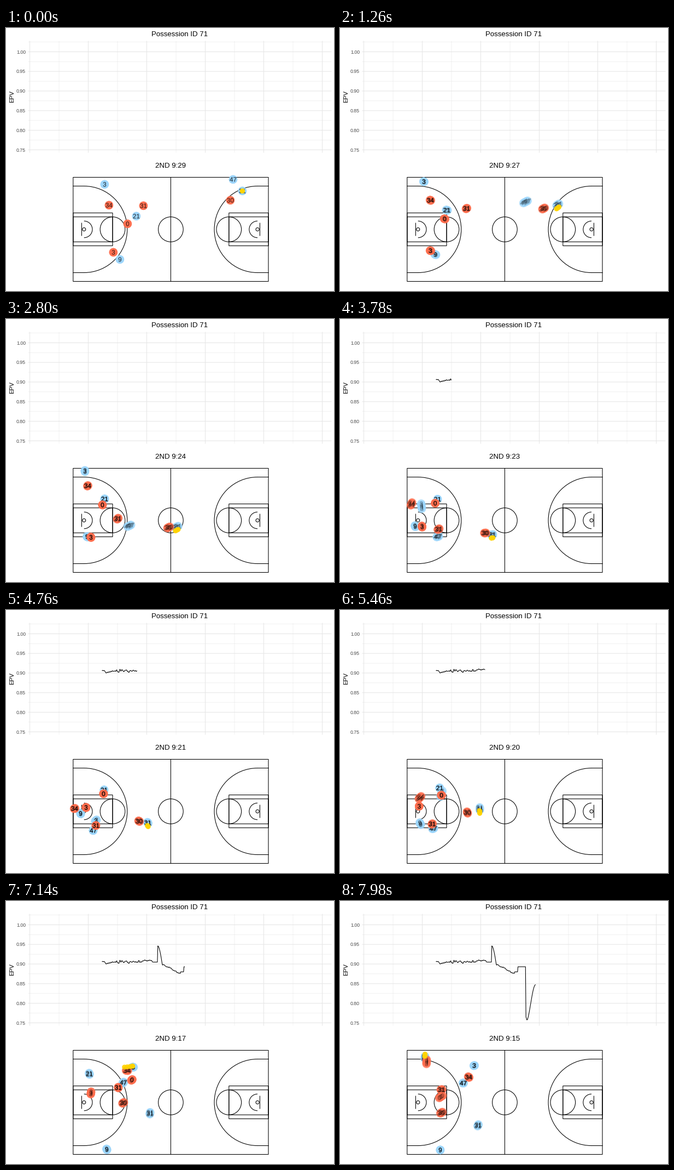
A matplotlib script for the animation above (8 s loop, 600 by 480 pixels).

```python
import numpy as np
import matplotlib.pyplot as plt
from matplotlib.animation import FuncAnimation
from matplotlib.collections import PathCollection
from matplotlib.patches import Arc, Circle, Rectangle
from matplotlib.path import Path
from matplotlib.textpath import TextPath
from matplotlib.transforms import Affine2D, IdentityTransform

plt.rcParams["font.family"] = "Liberation Sans"
PX = 0.72  # points per pixel at 100 dpi
STEP, TICK, LOOP = 140, 40, 8000
STEPS = (LOOP - 1) // STEP + 1
SAMPLES = 6  # tracking samples stamped per step
BLUE, RED, GOLD = "#9CD6FC", "#FF6D4D", "#FFD400"
STROKE = dict(lw=1.07 * PX, snap=False)

fig = plt.figure(figsize=(6, 4.8), dpi=100, facecolor="white")
ax = fig.add_axes([0, 0, 1, 1])
ax.set_xlim(0, 600)
ax.set_ylim(480, 0)
ax.axis("off")


def label(x, y, s, size, **kw):
    return ax.text(x, y, s, fontsize=size * PX, va="baseline", **kw)


def line(xs, ys, color="black", width=1.07):
    return ax.plot(xs, ys, color=color, lw=width * PX, snap=False)[0]


def draw_chart():
    for i in range(12):
        y = 222.4 - 17.9 * i
        line([41, 595], [y, y], "#E6E6E6", 0.55 if i % 2 else 1.07)
        if i % 2 == 0:
            label(36, y + 3.2, f"{0.75 + 0.025 * i:.2f}", 8.8,
                  ha="right", color="#4D4D4D")
    for i in range(11):
        x = 43.5 + 53.5 * i
        line([x, x], [24, 227], "#E6E6E6", 0.55 if i % 2 else 1.07)
    label(317.5, 15, "Possession ID 71", 13.2, ha="center")
    label(13.8, 125, "EPV", 11, ha="center", rotation=90,
          rotation_mode="anchor")


def draw_court():
    cx, cy, ft = 301.4, 367.5, 3.8  # centre and pixels per foot

    def box(x0, x1, half):
        ax.add_patch(Rectangle((x0, cy - half), x1 - x0, 2 * half,
                               fill=False, ec="black", **STROKE))

    def ring(x, r):
        ax.add_patch(Circle((x, cy), r, fill=False, ec="black", **STROKE))

    box(cx - 47 * ft, cx + 47 * ft, 25 * ft)
    line([cx, cx], [cy - 25 * ft, cy + 25 * ft])
    ring(cx, 6 * ft)
    for side in (1, -1):
        base, key, hoop, board = (cx - side * d * ft
                                  for d in (47, 28, 41.75, 42.9))
        box(base, key, 8 * ft - 0.4)
        box(base, key, 6 * ft)
        ring(key, 6 * ft)
        ring(hoop, 3)
        line([board, board], [cy - 3 * ft, cy + 3 * ft])
        for r in (4 * ft, 79):
            ax.add_patch(Arc((hoop, cy), 2 * r, 2 * r, angle=90 - 90 * side,
                             theta1=-90, theta2=90, ec="black", **STROKE))
        for dy in (-79, 79):
            line([base, hoop], [cy + dy] * 2)


# Key poses: where each player stands at a few shared steps
KEYS = np.array([0, 9, 20, 34, 43, 51, 57])
BLUE_POSES = {
    "3": [(180, 285), (153, 280), (144, 277), (164, 384), (203, 296),
          (232, 303), (245, 300)],
    "47": [(415, 276), (339, 317), (225, 377), (159, 402), (185, 387),
           (214, 331), (225, 332)],
    "21": [(238, 343), (195, 332), (180, 328), (179, 328), (180, 321),
           (152, 315), (155, 285)],
    "31": [(432, 297), (398, 322), (312, 379), (259, 388), (256, 349),
           (263, 387), (252, 409)],
    "9": [(208, 422), (174, 413), (148, 397), (136, 371), (158, 410),
          (184, 453), (183, 454)],
}
RED_POSES = {
    "34": [(188, 323), (165, 314), (149, 304), (125, 362), (169, 323),
           (221, 309), (235, 321)],
    "31": [(251, 324), (231, 329), (204, 364), (164, 393), (177, 381),
           (205, 340), (185, 344)],
    "30": [(410, 314), (372, 329), (297, 380), (243, 385), (226, 359),
           (214, 368), (185, 386)],
    "0": [(222, 357), (191, 348), (176, 339), (178, 335), (195, 338),
          (230, 326), (184, 357)],
    "3": [(196, 409), (165, 406), (155, 398), (146, 360), (145, 357),
          (155, 350), (158, 293)],
}

# Tracking time of every sample, in steps; the run starts at rest
T = np.arange(STEPS)[:, None] + (np.arange(SAMPLES) - 2.5) / SAMPLES
T = np.maximum(T, 0)[..., None]


def glide(poses):
    """Smooth (Hermite) path through the key poses."""
    p = np.array(poses, float) + 0.4
    d = np.gradient(p, KEYS, axis=0)
    i = np.clip(np.searchsorted(KEYS, T[..., 0]) - 1, 0, len(KEYS) - 2)
    h = np.diff(KEYS)[i][..., None]
    u = (T - KEYS[i][..., None]) / h
    ease = u * u * (3 - 2 * u)
    bend = h * u * (1 - u) * (d[i] * (1 - u) - d[i + 1] * u)
    return p[i] * (1 - ease) + p[i + 1] * ease + bend


def ramp(start, end):
    return np.clip((T - start) / (end - start), 0, 1)


def ball_path(team):
    """Dribbled by 31, passed to 3, then passed on to 21."""
    first, second = ramp(39.4, 41.3), ramp(50.9, 53.4)
    pos = team["31"] + (team["3"] - team["31"]) * first
    pos = pos + (team["21"] - pos) * second
    lift = 6 * ramp(0, 9) - 8 * first - 2 * second
    return pos + lift * [0, 1]


def value_curve():
    """Expected value over the possession, in stage pixels."""
    rng = np.random.default_rng(8)
    x = np.arange(176, 359, 5.13 / SAMPLES)
    noise = np.convolve(rng.normal(0, 2, x.size), [0.25, 0.5, 0.25], "same")
    calm = 113 - 0.045 * (x - 176) + noise
    spike = 82 + 35 * np.clip((x - 278) / 8, 0, 1) ** 1.6
    slide = 116 + 0.52 * (x - 287) + 0.6 * noise
    rise = np.sin(np.pi / 2 * np.clip((x - 342) / 16, 0, 1)) ** 1.6
    dip = 211 + 6.5 * np.clip((x - 340) / 2, 0, 1) - 65 * rise
    y = np.select([x < 268, x < 277.5, x < 286.5, x < 319, x < 325, x < 339.5],
                  [calm, 111.5, spike, slide, 129.3, 120], dip)
    return x, y


def stamp(path, color, alpha):
    c = PathCollection([path], offsets=np.empty((0, 2)),
                       offset_transform=ax.transData, facecolors=color,
                       edgecolors="none", linewidths=0, alpha=alpha, zorder=5)
    c.set_transform(IdentityTransform())
    return ax.add_collection(c, autolim=False)


def disc(r, color, alpha=0.7):
    return stamp(Path.unit_circle().transformed(Affine2D().scale(r)),
                 color, alpha)


def number(s):
    p = TextPath((0, 0), s, size=11.6)
    b = p.get_extents()
    shift = Affine2D().translate(-(b.x0 + b.x1) / 2, -(b.y0 + b.y1) / 2)
    return stamp(p.transformed(shift), "black", 0.36)


draw_chart()
draw_court()
clock = label(301.2, 255.4, "", 13.2, ha="center")
curve = line([], [])
cx, cy = value_curve()

blue = {s: glide(p) for s, p in BLUE_POSES.items()}
red = {s: glide(p) for s, p in RED_POSES.items()}
layers = []  # (artist, positions by step, player and sample)
for team, color in ((blue, BLUE), (red, RED)):
    layers.append((disc(7.7, color), np.stack(list(team.values()), axis=1)))
    layers += [(number(s), pos[:, None]) for s, pos in team.items()]
layers.append((disc(4.5, GOLD, 0.9), ball_path(blue)[:, None]))


def update(i):
    k = (i * TICK + TICK // 2) // STEP
    count = SAMPLES if k else SAMPLES // 2
    for artist, pos in layers:
        artist.set_offsets(pos[k][:, :count].reshape(-1, 2))
    clock.set_text(f"2ND 9:{int(29.5 - 0.24 * k):02d}")
    seen = cx <= 240 + 5.13 * (k - 34)
    curve.set_data(cx[seen], cy[seen])
    return []


anim = FuncAnimation(fig, update, frames=LOOP // TICK, interval=TICK,
                     init_func=lambda: update(0), repeat=True, repeat_delay=0)
plt.show()
```
